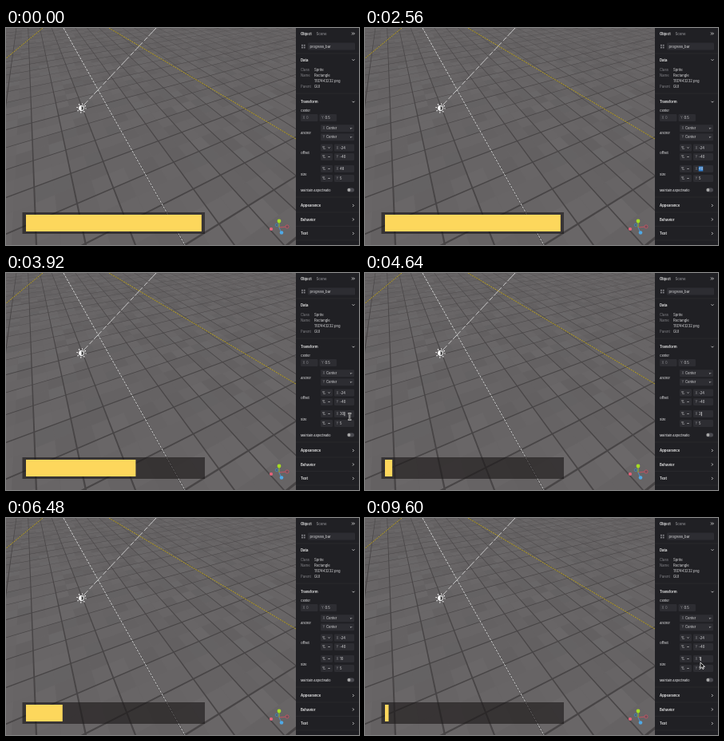
Animation of 442 by 272 pixels, one loop 9.68 s. Source, as an HTML page with a canvas:

```html
<!DOCTYPE html>
<html lang="en">
<head>
<meta charset="utf-8">
<title>Progress bar editor</title>
<style>
html, body { margin: 0; width: 100%; height: 100%; overflow: hidden; background: #202024; }
canvas, svg { position: absolute; left: 0; top: 0; width: 442px; height: 272px; }
text { font: 4.2px Inter, Roboto, sans-serif; fill: #dedee0; }
.head { font-weight: 600; font-size: 4.3px; fill: #f4f4f4; }
.label { font-weight: 500; font-size: 3.7px; }
.dim { fill: #85858a; }
</style>
</head>
<body>
<canvas id="floor" width="442" height="272"></canvas>
<svg id="ui" viewBox="0 0 442 272">
  <g id="lines" fill="none" stroke-width=".8">
    <path d="M46 0L0 38M129 0L363 139" stroke="#5b5230"/>
    <path d="M46 0L0 38M129 0L363 139" stroke="#d0b52c" stroke-dasharray="2 1"/>
    <path d="M72 0L224 272" stroke="#555"/>
    <path d="M72 0L224 272" stroke="#f4f4f4" stroke-dasharray="3 1.2"/>
    <path d="M188 0L97 97" stroke="#e4e4e4" stroke-dasharray="14 2 6 3"/>
  </g>
  <g id="sun" transform="translate(94.5 100.5)">
    <circle r="5.3" fill="none" stroke="#fff" stroke-width="1.700" stroke-dasharray="1 3.163"/>
    <circle r="3.4" fill="#fff"/>
    <path d="M0-2.500A2.500 2.500 0 0 1 0 2.500Z" fill="#444"/>
  </g>
  <rect x="20.5" y="231" width="228.5" height="27" fill="#1b1918" opacity=".63"/>
  <rect id="fill" x="25" y="234" height="21" fill="#fdd75c"/>
  <g id="gizmo" stroke-width=".8">
    <path d="M342 250V242" stroke="#9bd422"/>
    <path d="M342 250L352 249" stroke="#d94f61"/>
    <path d="M342 250L345 257" stroke="#3d9be0"/>
    <circle cx="332" cy="252" r="2.1" fill="#e8637b"/>
    <circle cx="352" cy="249" r="2.1" fill="#6d4f55" stroke="#c4596a"/>
    <circle cx="339" cy="247" r="1.8" fill="#4b6377" stroke="#4c87b0"/>
    <circle cx="342" cy="242" r="2.4" fill="#a5dc24"/>
    <circle cx="345" cy="256.500" r="2.3" fill="#4fa9e6"/>
  </g>
  <rect x="363" width="79" height="272" fill="#202024"/>
  <g id="panel"></g>
  <rect id="mark" x="417.700" y="173.500" height="6" fill="#2f7fd0"/>
  <text id="value" x="418" y="178"></text>
  <rect id="caret" y="174" width=".7" height="5.200" fill="#fff"/>
  <g id="beam" fill="none">
    <path d="M-2-4Q0-4 0-2.800Q0-4 2-4M0-3V3M-2 4Q0 4 0 2.800Q0 4 2 4" stroke="#fff" stroke-width="1.800"/>
    <path d="M-2-4Q0-4 0-2.800Q0-4 2-4M0-3V3M-2 4Q0 4 0 2.800Q0 4 2 4" stroke="#111" stroke-width=".7"/>
  </g>
  <path id="arrow" d="M0 0V7.500L1.800 5.900L3 8.500L4.300 7.900L3.100 5.400H5.500Z" fill="#111" stroke="#fff" stroke-width=".8"/>
</svg>
<script>
const $ = id => document.getElementById(id);
const LOOP = 9680, STEP = 80;

// Floor: square tiles seen in perspective, two line families meeting on one horizon.
function drawFloor() {
  const c = $('floor').getContext('2d');
  const left = 24.5, right = 800, horizon = -85, base = 272, span = right - left;
  const [u0, u1, v0, v1] = [-5, 21, -23, 3];
  let seed = 7;
  const rnd = () => (seed = seed * 16807 % 2147483647) / 2147483647;
  const point = (u, v) => {
    const a = 224 + 62 * u, b = 224 + 128 * v;
    const t = span / (a - b + span);
    return [left + (a - left) * t, horizon + (base - horizon) * t];
  };
  const quad = (u, v, w, h, color) => {
    c.fillStyle = color;
    c.beginPath();
    for (const p of [[u, v], [u + w, v], [u + w, v + h], [u, v + h]]) c.lineTo(...point(...p));
    c.fill();
  };
  c.fillStyle = '#676465';
  c.fillRect(0, 0, 363, 272);
  c.beginPath();
  c.rect(0, 0, 363, 272);
  c.clip();
  const n = 2;
  for (let u = u0; u < u1; u++) {
    for (let v = v0; v < v1; v++) {
      for (let i = 0; i < n * n; i++) {
        const k = rnd() - .5;
        quad(u + i % n / n, v + Math.floor(i / n) / n, 1 / n, 1 / n,
          k > 0 ? `rgba(255,250,250,${k * .05})` : `rgba(0,0,0,${-k * .07})`);
      }
    }
  }
  const w = .038;
  for (let u = u0; u < u1; u++) quad(u - w / 2, v0, w, v1 - v0, '#484546');
  for (let v = v0; v < v1; v++) quad(u0, v - w / 2, u1 - u0, w, '#484546');
}

function drawPanel() {
  let out = '';
  const text = (x, y, s, cls = '') => out += `<text x="${x}" y="${y + 1.5}" class="${cls}">${s}</text>`;
  const box = (x, y, w, h = 9) =>
    out += `<rect x="${x}" y="${y - h / 2}" width="${w}" height="${h}" rx="1.2" fill="#2d2d32"/>`;
  const stroke = (d, color = '#ddd', w = .8) => out += `<path d="${d}" fill="none" stroke="${color}" stroke-width="${w}"/>`;
  const rule = y => stroke(`M363 ${y}H442`, '#2b2b30', .7);
  const down = (x, y, r = 1.5) => stroke(`M${x - r} ${y - r / 2}l${r} ${r}l${r} ${-r}`);
  const next = y => stroke(`M434 ${y - 1.6}l1.6 1.6l-1.6 1.6`);
  const field = (x, y, w, axis, value) => {
    box(x, y, w);
    text(x + 2.5, y, axis, 'dim');
    text(x + 7, y, value);
  };

  text(369, 7, 'Object', 'head');
  text(388.5, 7, 'Scene', 'head dim');
  stroke('M433 5.500l1.500 1.500l-1.500 1.500M435 5.500l1.500 1.500l-1.500 1.500');
  for (let i = 0; i < 4; i++)
    out += `<rect x="${370 + i % 2 * 2.8}" y="${20.8 + (i >> 1) * 2.8}" width="1.8" height="1.8" fill="#88888d"/>`;
  box(378, 23, 59);
  text(380.5, 23, 'progress_bar');
  [32, 82, 212, 231, 248.5, 266].forEach(rule);

  text(369, 40, 'Data', 'head');
  down(435, 40);
  [['Class', 'Sprite', 52], ['Name', 'Rectangle', 59], ['', '1107443232.png', 66.5], ['Parent', 'GUI', 73.5]]
    .forEach(([k, v, y]) => { text(369, y, k, 'dim'); text(386, y, v); });

  text(369, 92.5, 'Transform', 'head');
  down(435, 92.5);
  text(369, 103, 'Center', 'label');
  field(369, 112.5, 21.5, 'X', '<tspan class="dim">0</tspan>');
  field(392.5, 112.5, 21.5, 'Y', '0.5');
  text(369, 131, 'Anchor', 'label');
  field(394, 125.8, 42, 'X', 'Center');
  field(394, 136.8, 42, 'Y', 'Center');
  down(432, 125.8, 1.1);
  down(432, 136.8, 1.1);
  text(369, 156.5, 'Offset', 'label');
  text(369, 183, 'Size', 'label');
  [[150, 'X', '-24'], [161.5, 'Y', '-40'], [176.5, 'X', ''], [188.5, 'Y', '5']].forEach(([y, axis, v]) => {
    box(394, y, 15);
    text(396, y, '%');
    down(404.5, y, 1);
    field(411, y, 25, axis, v);
  });
  text(369, 203, 'Maintain AspectRatio', 'label');
  out += '<rect x="427" y="200.500" width="9" height="5" rx="2.500" fill="#4a4a50"/><circle cx="429.500" cy="203" r="1.900" fill="#aaa"/>';
  [['Appearance', 222.5], ['Behavior', 240], ['Text', 257.5]].forEach(([s, y]) => { text(369, y, s, 'head'); next(y); });
  $('panel').innerHTML = out;
}

// time, value, mode: 0 idle, 1 selected, 2 caret
const edits = [
  [0, 48, 0], [2560, 48, 1], [2800, 3, 2], [2880, 30, 2], [4160, 30, 1],
  [4640, 2, 2], [4800, 20, 2], [5200, 20, 0], [5520, 20, 1],
  [5840, 1, 2], [5920, 10, 2], [6480, 10, 0], [6720, 10, 1],
  [7360, 5, 2], [7920, 5, 0], [8320, 5, 1], [8480, 1, 2], [9120, 1, 0], [9520, 1, 2]
];

// start, end, from, to, shape
const moves = [
  [400, 800, [441, 235], [428, 190], 'arrow'],
  [800, 960, [428, 190], [428, 190], 'arrow'],
  [960, 1520, [428, 180], [426, 177], 'beam'],
  [3600, 3840, [427, 178.5], [427, 178.5], 'beam'],
  [3840, 4160, [432, 181], [427, 178], 'beam'],
  [4160, 4640, [427, 178], [427, 178], 'beam'],
  [5440, 5840, [426.5, 176.5], [426.5, 176.5], 'beam'],
  [6560, 7360, [426.5, 176.5], [426.5, 176.5], 'beam'],
  [8160, 8480, [426.5, 176.5], [426.5, 176.5], 'beam'],
  [9280, 9440, [426.5, 176.5], [425, 178], 'beam'],
  [9440, 9680, [423, 178], [420, 181], 'arrow']
];

function render(now) {
  const t = Math.floor(now % LOOP / STEP) * STEP;
  const [, value, mode] = edits.findLast(e => e[0] <= t);
  const width = value > 9 ? 5.6 : 2.9;
  $('fill').setAttribute('width', value * 4.58);
  $('value').textContent = value;
  $('mark').setAttribute('width', mode === 1 ? width : 0);
  $('caret').setAttribute('x', 418 + width - (value === 1));
  $('caret').style.display = mode === 2 ? '' : 'none';

  const move = moves.find(m => t >= m[0] && t < m[1]);
  for (const id of ['beam', 'arrow']) $(id).style.display = move && move[4] === id ? '' : 'none';
  if (move) {
    const [start, end, from, to, id] = move;
    const p = Math.min(1, (t - start) / (end - start - STEP));
    const [x, y] = from.map((f, i) => f + (to[i] - f) * p);
    $(id).setAttribute('transform', `translate(${x} ${y})`);
  }
}

drawFloor();
drawPanel();
const begin = performance.now();
function tick() {
  render(performance.now() - begin);
  requestAnimationFrame(tick);
}
tick();
</script>
</body>
</html>
```
